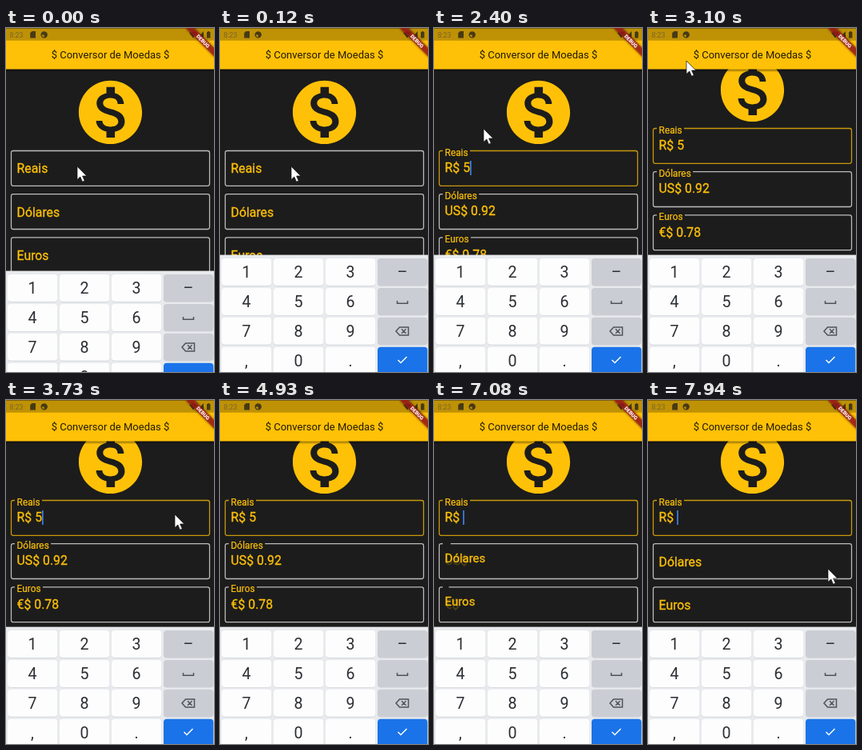
An HTML page that plays this animation: 260 px wide and 430 px high, repeating every 8 s.

```html
<!DOCTYPE html>
<html lang="pt">
<head>
<meta charset="utf-8">
<title>Conversor de Moedas</title>
<style>
  html, body { margin: 0; width: 100%; height: 100%; overflow: hidden; background: #1c1c1c; }
  svg { display: block; width: 260px; height: 430px; font-family: Roboto, "Noto Sans", sans-serif; }
  .field text { font-size: 15.8px; fill: #ffc107; stroke: #ffc107; stroke-width: .3; white-space: pre; }
  .field path { fill: none; stroke-width: 1.27; }
  .key { font-size: 19.6px; fill: #2b2e32; text-anchor: middle; }
  .glyph { fill: none; stroke: #50545a; stroke-width: 1.5; }
  #keys { animation: rise 8s step-end infinite; }
  @keyframes rise { 0% { transform: translateY(20px); } 1.5%, 100% { transform: none; } }
</style>
</head>
<body>
<svg viewBox="0 0 260 430">
  <defs>
    <linearGradient id="shade" x2="0" y2="1">
      <stop offset="0" stop-color="#000" stop-opacity=".45"/>
      <stop offset="1" stop-color="#000" stop-opacity="0"/>
    </linearGradient>
    <filter id="soft" x="-20%" y="-60%" width="140%" height="220%">
      <feGaussianBlur stdDeviation="1.8"/>
    </filter>
  </defs>
  <rect width="260" height="430" fill="#1c1c1c"/>

  <g id="list">
    <path transform="translate(83 57.9) scale(3.96)" fill="#ffc107" d="M12 2C6.48 2 2 6.48 2 12s4.48 10 10 10 10-4.48 10-10S17.52 2 12 2zm1.41 16.09V20h-2.67v-1.93c-1.71-.36-3.16-1.46-3.27-3.4h1.96c.1 1.05.82 1.87 2.65 1.87 1.96 0 2.4-.98 2.4-1.59 0-.83-.44-1.61-2.67-2.14-2.48-.6-4.18-1.62-4.18-3.67 0-1.72 1.39-2.84 3.11-3.21V4h2.67v1.95c1.86.45 2.79 1.86 2.85 3.39H14.3c-.05-1.11-.64-1.87-2.22-1.87-1.5 0-2.4.68-2.4 1.64 0 .84.65 1.39 2.67 1.91s4.18 1.39 4.18 3.91c-.01 1.83-1.38 2.83-3.12 3.16z"/>
    <rect id="caret" y="166" width="1.6" height="18" fill="#4285f4"/>
  </g>

  <rect y="51.5" width="260" height="4" fill="url(#shade)"/>
  <rect y=".7" width="260" height="50.8" fill="#ffc107"/>
  <rect y=".7" width="260" height="15" fill="#bf9105"/>
  <text x="130.5" y="38.4" font-size="13" text-anchor="middle" fill="#211a01">$ Conversor de Moedas $</text>

  <g fill="#463a16">
    <text x="4.5" y="12" font-size="8.85" fill="#78652c">8:23</text>
    <path d="M32.5 4H37v8.5h-6.8V6.3z"/>
    <circle cx="47.7" cy="8.4" r="4.2"/>
    <path d="M47.7 8.4V11.2A2.8 2.8 0 0 1 44.9 8.4z" fill="#bf9105"/>
    <path d="M229 6Q234 2.500 239 6L234 12.500zM247 4v8.500h-7.500zM251 5h1.200V4h2v1h1.200v7.500H251z"/>
  </g>

  <g transform="translate(261.5 1.2) rotate(45)">
    <rect x="-26" y="17.7" width="52" height="7.6" opacity=".6" filter="url(#soft)"/>
    <rect x="-26" y="17.7" width="52" height="7.6" fill="#b71c1c" fill-opacity=".7"/>
    <text y="23.8" font-size="6.45" font-weight="900" text-anchor="middle" fill="#fff">DEBUG</text>
  </g>

  <g id="keys"><rect y="283.6" width="260" height="150" fill="#e8eaed"/></g>

  <path id="mouse" d="M0 0V16.5L3.8 13 6.5 19.2 9.3 18 6.6 12H11.8z" fill="#fff" stroke="#111" stroke-width=".7"/>
</svg>
<script>
const LOOP = 8000, BLINK = 495;
const $ = id => document.getElementById(id);
const mix = (a, b, p) => a + (b - a) * p;

// Smooth 0 to 1 ramp
function ramp(t, start, length) {
  const p = Math.min(1, Math.max(0, (t - start) / length));
  return p * p * (3 - 2 * p);
}

function add(parent, tag, attrs, text) {
  const el = document.createElementNS("http://www.w3.org/2000/svg", tag);
  set(el, attrs);
  if (text) el.textContent = text;
  parent.append(el);
  return el;
}

function set(el, attrs) {
  for (const k in attrs) el.setAttribute(k, attrs[k]);
}

// Keyboard
const keys = $("keys");
["123–", "456 ", "789 ", ",0. "].forEach((row, r) => [...row].forEach((ch, c) => {
  const x = 2 + c * 65, y = 288 + r * 36.9;
  const fill = c < 3 ? "#fdfdfe" : r < 3 ? "#cacdd3" : "#1a73e8";
  const box = { x, width: 62.3, height: 34, rx: 4 };
  add(keys, "rect", { ...box, y: y + 0.7, fill: "#d0d2d6" });
  add(keys, "rect", { ...box, y, fill });
  add(keys, "text", { class: "key", x: x + 31, y: y + 24.2 }, ch);
}));
const glyph = (d, style = "") => add(keys, "path", { class: "glyph", d, style });
glyph("M221.5 341V344.3H234.5V341");
glyph("M224.5 374H235.5V384H224.5L220 379zM227 376.3L232.5 381.8M232.5 376.3L227 381.8");
glyph("M222.5 415L226 418.5 233.5 411", "stroke:#fff");

// Text fields
const TEXT_X = 13.6;
const fields = [["Reais", "R$ "], ["Dólares", "US$ "], ["Euros", "€$ "]].map(([name, sign], i) => {
  const g = add($("list"), "g", { class: "field", transform: `translate(0 ${153.5 + i * 54.2})` });
  const border = add(g, "path", {});
  const prefix = add(g, "text", { x: TEXT_X, y: 26.8 }, sign);
  const value = add(g, "text", { x: TEXT_X + prefix.getComputedTextLength(), y: 26.8 });
  const label = add(g, "text", {}, name);
  return { border, prefix, value, label, gap: label.getComputedTextLength() * 0.75 + 5 };
});
$("list").append($("caret"));

function drawField(f, lift, amount, color) {
  set(f.border, {
    d: `M${11 + f.gap * lift} 0H252q2.5 0 2.5 2.5V41.3q0 2.5 -2.5 2.5H9q-2.5 0 -2.5 -2.5V2.5Q6.5 0 9 0H11`,
    stroke: color
  });
  set(f.label, { transform: `translate(${TEXT_X} ${mix(27.9, 6.2, lift)}) scale(${mix(1, 0.75, lift)})` });
  set(f.prefix, { opacity: lift });
  f.value.textContent = amount;
}

// Reais per unit of each currency
const RATES = [1, 5.414, 6.403];
const FOCUS = 270;
const edits = [[0, ""], [1510, "5"], [6040, "55"], [6810, "5"], [6960, ""]];

// Pointer moves: start, length, x, y
const moves = [
  [270, 120, 88, 177], [2300, 100, 62, 126], [2450, 100, 53, 114], [2860, 240, 48, 41],
  [3130, 600, 211, 143], [3730, 200, 275, 180], [7700, 90, 231, 206], [7850, 90, 225, 211]
];

function draw(t) {
  const [edited, typed] = edits.findLast(([time]) => time <= t);
  const focus = ramp(t, FOCUS - 30, 200);
  const lift = ramp(t, 1440, 200) - ramp(t, 6920, 230);
  fields.forEach((f, i) => {
    const amount = typed && i ? (typed / RATES[i]).toFixed(2) : typed;
    drawField(f, i ? lift : focus, amount, i || !focus ? "#bcbcbc" : "#c8990d");
  });

  const phase = Math.floor((t - Math.max(FOCUS, edited) + 125) / BLINK);
  set($("caret"), { x: 36.2 + typed.length * 8.87, opacity: t >= FOCUS && phase % 2 === 0 ? 1 : 0 });

  set($("list"), { transform: `translate(0 ${-28 * ramp(t, 2860, 240)})` });

  let x = 89, y = 173;
  for (const [start, length, toX, toY] of moves) {
    const p = ramp(t, start, length);
    x = mix(x, toX, p);
    y = mix(y, toY, p);
  }
  set($("mouse"), { transform: `translate(${x} ${y})` });
}

const start = performance.now();
function tick() {
  draw((performance.now() - start) % LOOP);
  requestAnimationFrame(tick);
}
tick();
</script>
</body>
</html>
```
